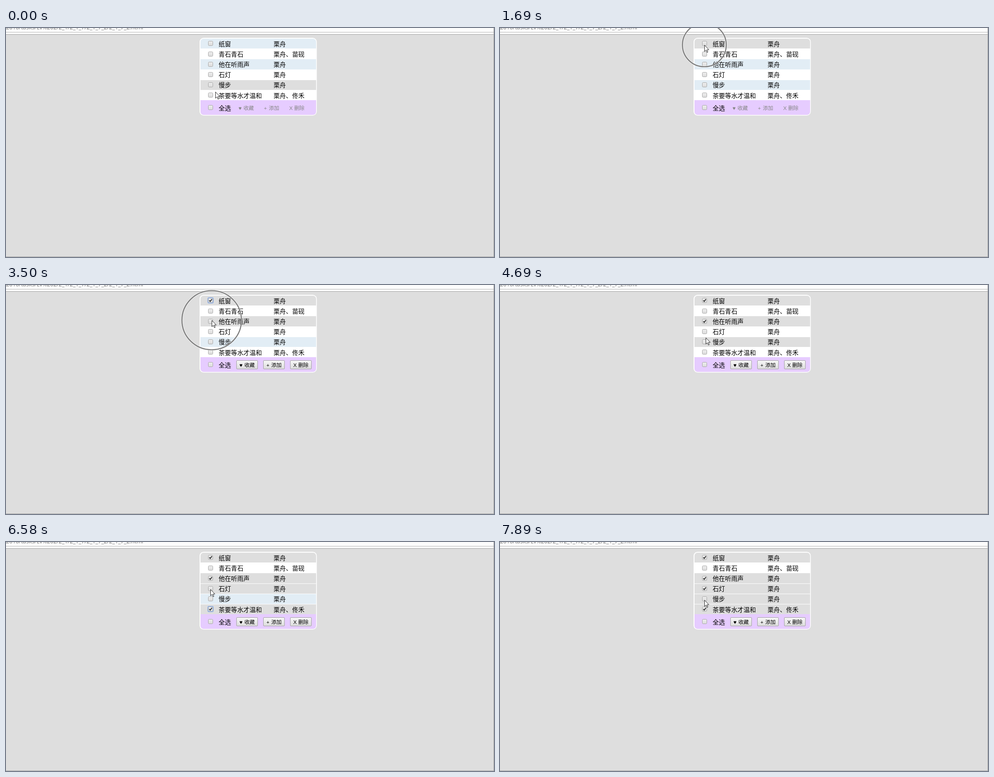
An HTML page for the animation above (8000 ms loop, 1089 by 514 pixels).

```html
<!DOCTYPE html>
<html lang="zh">
<head>
<meta charset="utf-8">
<title>Song list</title>
<style>
  html, body { margin: 0; width: 100%; height: 100%; overflow: hidden; background: #dedede; }
  svg { display: block; width: 100%; height: 100%; }
  text { font: 350 13.8px "Noto Sans CJK SC", "Noto Sans CJK", sans-serif; fill: #000; }
  .address { font: 12.6px "Open Sans", sans-serif; fill: #777; }
  .label { font-size: 11.6px; }
  .symbol { font: 11.6px "Liberation Sans", sans-serif; }
  .off { fill: #868686; }
</style>
</head>
<body>
<svg viewBox="0 0 1089 514">
  <defs>
    <linearGradient id="boxFill" x2="0" y2="1"><stop stop-color="#eee"/><stop offset="1" stop-color="#dcdcdc"/></linearGradient>
    <linearGradient id="buttonFill" x2="0" y2="1"><stop stop-color="#f8f8f8"/><stop offset="1" stop-color="#dcdcdc"/></linearGradient>
    <clipPath id="inner"><rect x="434" y="24" width="258" height="171" rx="7"/></clipPath>
  </defs>
  <path fill="#fcfcfc" d="M0 0H1089V14H0Z"/>
  <path fill="#b4b4b4" d="M0 9H1089V10H0Z"/>
  <path fill="#a2a2a2" d="M0 14H1089V15H0ZM0 513H1089V514H0ZM1088 0H1089V514H1088Z"/>
  <text class="address" x="0" y="3.4">2016/tasks/Lv%202/2_1/2_1_7/2_1_7_2/2_1_7_2.html</text>
  <rect x="432" y="22" width="261.5" height="174.5" rx="9" fill="#fff"/>
  <g id="scene"></g>
</svg>
<script>
const LOOP = 8000;
const GREY = '#dedede';
const ROW_PITCH = 23.2;

// checked: when the song is ticked; ring: when its checkbox shows the focus ring
const songs = [
  { title: '纸窗', singer: '栗舟', checked: 2090, ring: [3360, 3760] },
  { title: '青石青石', singer: '栗舟、苗砚' },
  { title: '他在听雨声', singer: '栗舟', checked: 3890, ring: [4820, 5370] },
  { title: '石灯', singer: '栗舟', checked: 6960 },
  { title: '慢步', singer: '栗舟' },
  { title: '茶要等水才温和', singer: '栗舟、佟禾', checked: 5510, ring: [5370, 6960] }
];
const buttons = [['♥', '收藏'], ['+', '添加'], ['X', '删除']];

// Turning points of the pointer: time, x, y
const path = [
  [0, 467, 143], [400, 466, 180], [890, 469, 59], [1040, 469, 57], [1430, 456, 38],
  [2090, 456, 38], [2390, 455, 48], [2780, 456, 72], [3200, 459, 79], [4280, 459, 79],
  [4690, 459, 118], [5220, 459, 151], [5640, 459, 151], [6310, 457, 113], [6580, 456, 106],
  [6980, 456, 106], [7210, 456, 130], [LOOP, 456, 130]
];
const ripples = [
  { start: 1560, radius: 86 }, { start: 3500, radius: 69 },
  { start: 6710, radius: 69 }, { start: 7490, radius: 86 }
];

function pointerAt(t) {
  const next = path.findIndex(point => point[0] > t);
  const [t0, x0, y0] = path[next - 1];
  const [t1, x1, y1] = path[next];
  const u = (t - t0) / (t1 - t0);
  return [Math.round(x0 + (x1 - x0) * u), Math.round(y0 + (y1 - y0) * u)];
}

// Each ring shrinks in jumps until nothing is left.
function rippleRadius(t) {
  const current = ripples.findLast(ripple => ripple.start <= t);
  return current ? Math.max(0, current.radius - 34.5 * Math.floor((t - current.start) / 125)) : 0;
}

const rowLine = (first, i) => Math.round(first + ROW_PITCH * i);
const rowTop = i => rowLine(24, i);
const text = (x, y, content, cls = '') => `<text x="${x}" y="${y}" class="${cls}">${content}</text>`;
const rect = (x, y, w, h, fill, more = '') =>
  `<rect x="${x}" y="${y}" width="${w}" height="${h}" fill="${fill}" ${more}/>`;

function checkbox(y, checked, focused) {
  const ring = focused ? rect(450.5, y - .5, 12, 12, 'none', 'rx="2" stroke="#86aae6" stroke-width="1.3"') : '';
  const mark = checked
    ? `<path d="M453.6 ${y + 5.4}l2.1 2.5 4-5.2" fill="none" stroke="#333" stroke-width="1.9"/>` : '';
  return rect(451.5, y + .5, 10, 10, 'url(#boxFill)', 'rx="2" stroke="#a6a6a6"') + ring + mark;
}

function songRow({ title, singer, checked, ring }, i, hovered, t) {
  const y = rowTop(i);
  const baseline = rowLine(40.6, i);
  const ticked = t >= checked;
  const focused = ring && t >= ring[0] && t < ring[1];
  const fill = hovered || ticked ? GREY : i % 2 ? '#fff' : '#e2edf5';
  return rect(434, y, 258, rowTop(i + 1) - 1 - y, fill) + checkbox(rowLine(29.3, i), ticked, focused) +
    text(474.5, baseline, title) + text(597, baseline, singer);
}

function button([symbol, label], i, enabled) {
  const x = 514 + 60 * i;
  const left = enabled ? x + 7 : 519 + 56.5 * i;
  const cls = enabled ? '' : ' off';
  const face = enabled
    ? rect(x + .5, 169.5, 47, 19, 'url(#buttonFill)', 'rx="1.5" stroke="#a0a0a0"') : '';
  return face + text(left, 184, symbol, 'symbol' + cls) + text(left + 11, 184, label, 'label' + cls);
}

function rippleRing(x, y, outer) {
  if (!outer) return '';
  const circle = (color, width, opacity) =>
    `<circle cx="${x}" cy="${y}" r="${outer - 2.6}" fill="none" stroke="${color}" stroke-width="${width}" opacity="${opacity}"/>`;
  return circle('#fff', 4.6, .5) + circle('#7c7c7c', 2.4, 1);
}

function scene(t) {
  const [x, y] = pointerAt(t);
  // The highlight trails the pointer at the very start.
  const hover = t < 140 ? 4 : songs.findIndex((_, i) => y < rowTop(i + 1));
  const rows = songs.map((song, i) => songRow(song, i, i === hover, t)).join('');
  const enabled = songs.some(song => t >= song.checked);
  return `<g clip-path="url(#inner)">${rows}${rect(434, 162, 258, 33, '#e6ccff')}</g>` +
    checkbox(173, false, false) + text(474.5, 184.5, '全选') +
    buttons.map((b, i) => button(b, i, enabled)).join('') + rippleRing(x, y, rippleRadius(t)) +
    `<path transform="translate(${x} ${y})" d="M.5.5V14.6L3.7 11.6 6 16.8 8 16 5.8 10.9H10.2Z" fill="#fff" stroke="#222"/>`;
}

const stage = document.getElementById('scene');
let shown = '';
function frame() {
  const next = scene(performance.now() % LOOP);
  if (next !== shown) stage.innerHTML = shown = next;
  requestAnimationFrame(frame);
}
frame();
</script>
</body>
</html>
```
